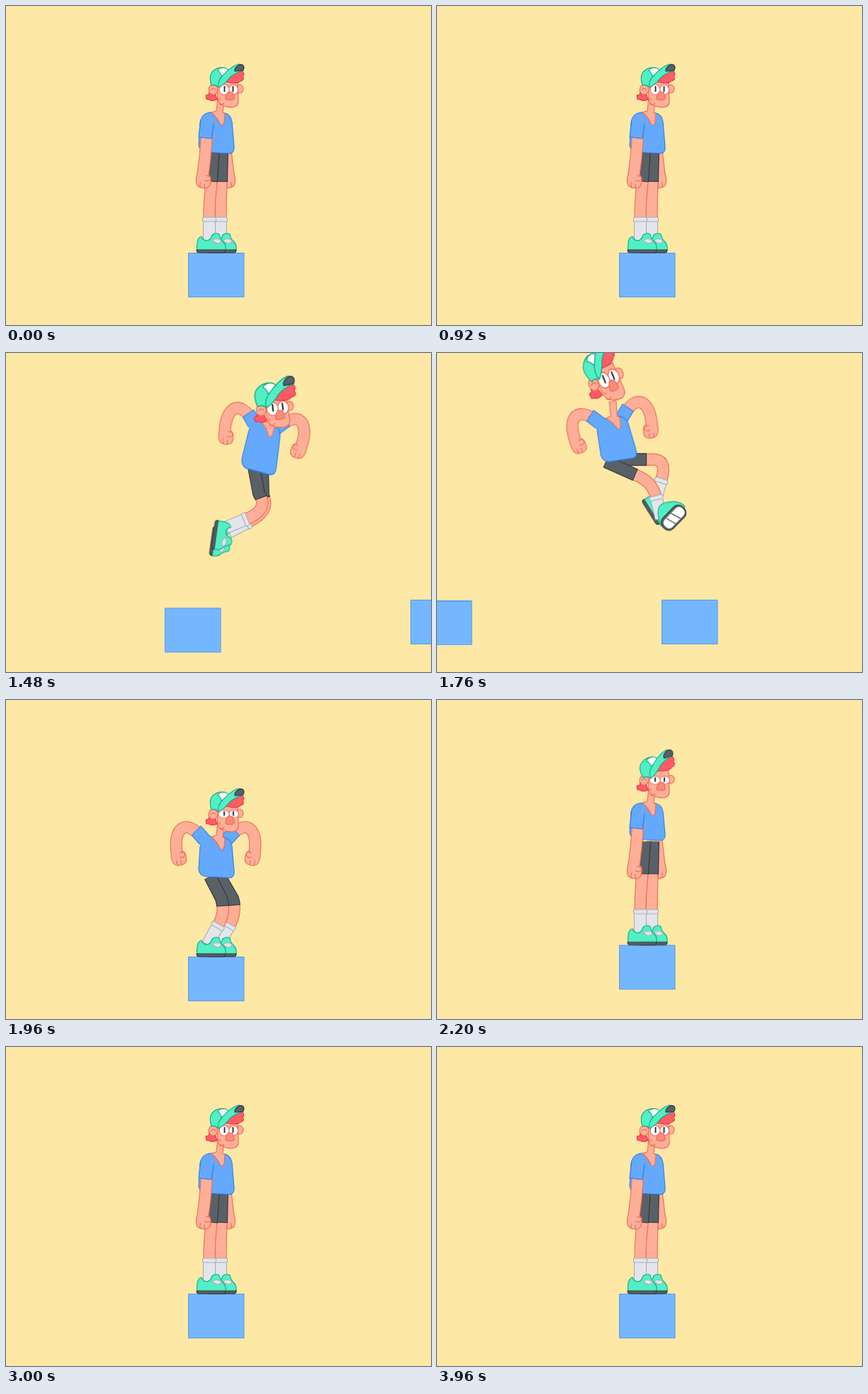
Animation of 600 by 450 pixels, one loop 4000 ms. Source, as an HTML page without scripts:

```html
<!DOCTYPE html>
<html lang="en">
<head>
<meta charset="utf-8">
<title>Jump</title>
<style>
html, body { margin: 0; width: 100%; height: 100%; overflow: hidden; background: #fde8a6; }
svg { display: block; width: 100vw; height: 100vh; }
path, rect, ellipse { stroke-width: 1.1; stroke-linejoin: round; }

.block { fill: #75b7ff; stroke: #5799e6; stroke-width: 1; }
.skin { fill: #ffae98; stroke: #ee6a55; }
.blue { fill: #64a9fe; stroke: #2c7ce8; }
.mint { fill: #52efc5; stroke: #13a883; }
.red { fill: #ff5b66; stroke: #dc3a4c; }
.dark { fill: #596167; stroke: #30363b; }
.pale { fill: #e3e5ea; stroke: #a9adb5; }
.white { fill: #fff; stroke: #ee6a55; }
.nose { fill: #f78b79; stroke: #ee6a55; }
.line { fill: none; stroke: #ee6a55; }
.ink { fill: none; stroke: #24282d; }

/* a limb is a wide outline stroke under a narrower colour stroke */
.edge, .core { fill: none; }
.edge { stroke: #ee6a55; stroke-width: 17.2; }
.core { stroke: #ffae98; stroke-width: 15; }
.arm.core { marker-end: url(#fist); }
.leg1.core, .leg2.core { marker-end: url(#sock); }
.edge.shorts { stroke: #30363b; stroke-width: 18; stroke-dasharray: 46 999; }
.core.shorts { stroke: #596167; stroke-width: 15.8; stroke-dasharray: 45 999; marker-end: none; }

.m { animation: 4s cubic-bezier(.4,.2,.6,.8) infinite; }
.slide { animation-name: slide; }
.kick { animation-name: kick; }
.give { animation-name: give; }
.arc { animation-name: arc; }
.drop { animation-name: drop; }
.chest { animation-name: chest; transform-origin: 296px 152px; }
.torso { animation-name: torso; transform-origin: 296px 152px; }
.swing { animation-name: swing; transform-origin: 284px 158px; }
.sleeve { animation-name: sleeve; transform-origin: 284px 158px; }
.arm { animation-name: arm; }
.leg1 { animation-name: leg1; }
.leg2 { animation-name: leg2; }
.foot1 { animation-name: foot1; }
.foot2 { animation-name: foot2; }
.tilt { animation-name: tilt; }
.side { animation-name: side; }
.under { animation-name: under; }
.head { animation-name: head; transform-origin: 314.5px 118px; }
.eyes { animation-name: eyes; transform-origin: 314.5px 118px; }
.hat { animation-name: hat; transform-origin: 302px 106px; }

/* key times: crouch 31, push 34.5, rise 37, glide 44, land 49, stretch 55, rest 63 */
@keyframes slide {
  0%, 34.6% { transform: none; animation-timing-function: cubic-bezier(.33,0,.67,1); }
  47.4%, 100% { transform: translateX(-347px); }
}
@keyframes kick {
  0%, 24%, 48%, 100% { transform: none; }
  31% { transform: translateY(4px); }
  37% { transform: translateY(11.5px); }
  44% { transform: translateY(1.5px); }
}
@keyframes give {
  0%, 24%, 37%, 47.5%, 63%, 100% { transform: none; }
  31% { transform: translateY(4px); }
  49% { transform: translateY(14px); }
  55% { transform: translateY(-2.5px); }
}
@keyframes arc {
  0%, 37%, 44%, 100% { transform: none; }
  40% { transform: translate(8px,-14px); }
}
@keyframes drop {
  0%, 24%, 34.5%, 44%, 63%, 100% { transform: none; }
  31%, 49% { transform: translateY(29px); }
  55% { transform: translateY(-2.5px); }
}
@keyframes chest {
  0%, 34.5%, 49%, 100% { transform: translate(0,0) rotate(0deg); }
  37% { transform: translate(71px,-51px) rotate(11deg); }
  44% { transform: translate(-51px,-59px) rotate(-12deg); }
}
@keyframes torso {
  0%, 34.5%, 49%, 63%, 100% { transform: none; }
  37% { transform: scaleY(1.22); }
  44% { transform: scaleY(1.08); }
  55% { transform: scaleY(.91); }
}
@keyframes swing {
  0%, 24%, 37%, 100% { transform: none; }
  31% { transform: rotate(18deg); }
}
@keyframes sleeve {
  0%, 34.5%, 55%, 100% { transform: rotate(0deg) scale(1); }
  37%, 49% { transform: rotate(130deg) scale(1,.8); }
}
@keyframes arm {
  0%, 34.5%, 55%, 100% { d: path("M284 160C284 195 281 215 278 238"); }
  37%, 49% { d: path("M274 148C252 124 236 140 241 172"); }
}
@keyframes leg1 {
  0%, 24%, 34.5%, 55%, 100% { d: path("M293 202L290 248Q287 275 287 299"); }
  31%, 49% { d: path("M288 235L304 266Q310 285 300 303"); }
  37% { d: path("M350 160L357 198Q372 221 340 234"); }
  44% { d: path("M238 153L283 173Q304 182 309 202"); }
}
@keyframes leg2 {
  0%, 24%, 34.5%, 55%, 100% { d: path("M305 202L304 248Q303 275 303 299"); }
  31%, 49% { d: path("M302 235L320 266Q326 285 316 303"); }
  37% { d: path("M362 160L363 202Q374 222 343 238"); }
  44% { d: path("M250 150L302 150Q326 148 317 178"); }
}
@keyframes foot1 {
  0%, 34.5%, 49%, 100% { transform: translate(286px,330px); }
  37% { transform: translate(311px,255px); }
  44% { transform: translate(320px,222px); }
}
@keyframes foot2 {
  0%, 34.5%, 49%, 100% { transform: translate(301px,330px); }
  37% { transform: translate(308px,264px); }
  44% { transform: translate(313px,213px); }
}
@keyframes tilt {
  0%, 34.5%, 49%, 100% { transform: rotate(0deg); }
  37% { transform: rotate(98deg); }
  44% { transform: rotate(58deg); }
}
@keyframes side {
  0%, 46.5%, 100% { opacity: 1; animation-timing-function: step-end; }
  41.5% { opacity: 0; animation-timing-function: step-end; }
}
@keyframes under {
  0%, 46.5%, 100% { opacity: 0; animation-timing-function: step-end; }
  41.5% { opacity: 1; animation-timing-function: step-end; }
}
@keyframes head {
  0%, 34.5%, 49%, 100% { transform: translate(0,0) rotate(0deg) scale(1); }
  37% { transform: translate(69.5px,-40px) rotate(-7deg) scale(1.08,1.1); }
  44% { transform: translate(-72px,-82.5px) rotate(-22deg) scale(1.05,1.3); }
}
@keyframes eyes {
  0%, 24%, 34.5%, 63%, 100% { transform: scale(1); }
  31%, 49%, 55% { transform: scale(1.08,.8); }
  37%, 44% { transform: scale(1.08,1.2); }
}
@keyframes hat {
  0%, 34.5%, 49%, 63%, 100% { transform: rotate(0deg) scale(1); }
  37% { transform: rotate(0deg) scale(1.13); }
  44% { transform: rotate(-14deg) scale(1); }
  55% { transform: rotate(-12deg) scale(1.05); }
}
</style>
</head>
<body>
<svg viewBox="0 0 600 450">
  <defs>
    <marker id="fist" markerUnits="userSpaceOnUse" markerWidth="30" markerHeight="30" orient="auto" overflow="visible">
      <g transform="rotate(-90) translate(1 8)">
        <path class="skin" d="M-9-9Q-11 2-7 8Q-2 12 6 10Q12 8 11-1Q11-8 6-9"/>
        <path class="line" d="M3-7Q12-8 10-2Q6 2 2-1M-3 3Q-4 8-2 10M3 4V10"/>
      </g>
    </marker>
    <marker id="sock" markerUnits="userSpaceOnUse" markerWidth="40" markerHeight="30" orient="auto" overflow="visible">
      <rect class="pale" x="0" y="-8.5" width="32" height="17"/>
      <rect class="pale" x="-1" y="-9.5" width="6" height="19" rx="1.5"/>
    </marker>
    <g id="shoe">
      <path class="mint" d="M-16 15Q-18-3-10-5Q-8 1-2 1Q3 0 5-7Q10-11 15-8Q16-2 21 3Q25 7 24 15Z"/>
      <path class="pale" d="M5 1Q11-4 18 1Q18 4 12 5Q8 3 5 1Z"/>
      <path class="dark" d="M-17 14H24Q24 18 20 18H-13Q-17 18-17 14Z"/>
    </g>
  </defs>

  <rect width="600" height="450" fill="#fde8a6"/>

  <g class="m slide">
    <rect class="m kick block" x="257.500" y="348.500" width="78.500" height="62"/>
    <rect class="m give block" x="604.500" y="348.500" width="78.500" height="62"/>
  </g>

  <g class="m give"><g class="m arc">

    <!-- far arm: the near arm mirrored -->
    <g class="m drop"><g class="m chest"><g transform="matrix(-1 0 0 1 592 0)">
      <g class="m swing"><path class="m arm edge"/><path class="m arm core"/></g>
      <g class="m swing"><path class="m sleeve blue" d="M275 157L272 185L290 187L293 160Z"/></g>
    </g></g></g>

    <path class="m leg2 edge"/><path class="m leg2 core"/>
    <path class="m leg2 edge shorts"/><path class="m leg2 core shorts"/>
    <g class="m foot2"><g class="m tilt"><use href="#shoe"/></g></g>

    <path class="m leg1 edge"/><path class="m leg1 core"/>
    <path class="m leg1 edge shorts"/><path class="m leg1 core shorts"/>
    <g class="m foot1">
      <g class="m side"><g class="m tilt"><use href="#shoe"/></g></g>
      <g class="m under">
        <path class="mint" d="M-7 10Q-11-8 2-11Q21-16 30-6L18 14Q0 26-5 20Z"/>
        <g transform="translate(14 10) rotate(-46)">
          <rect class="dark" x="-20" y="-10.500" width="40" height="21" rx="9"/>
          <rect x="-17" y="-7" width="35" height="15" rx="6" fill="#fff"/>
          <path class="ink" d="M-8-7L-4 8M2-7L6 8"/>
        </g>
      </g>
    </g>

    <g class="m drop">
      <g class="m chest">
        <path class="m torso blue" d="M287 150Q276 152 274 164L272 196Q273 204 281 206L316 208Q323 207 322 198L319 163Q317 153 309 151Z"/>
        <g class="m swing"><path class="m arm edge"/><path class="m arm core"/></g>
        <g class="m swing">
          <g class="m sleeve">
            <path d="M275 160L272 185L290 187L293 166Q287 150 275 160Z" fill="#64a9fe"/>
            <path fill="none" stroke="#2c7ce8" d="M275 160L272 185L290 187L293 166"/>
          </g>
        </g>
        <path class="skin" d="M299 128L297 148L290 150Q299 158 302 166Q306 171 308 164L309 152L306 150L309 128Z"/>
      </g>

      <g class="m head">
        <path class="red" d="M294 119Q284 121 287 125Q280 125 283 129Q281 132 287 132Q290 135 298 132Z"/>
        <ellipse class="skin" cx="330" cy="117" rx="5" ry="6"/>
        <path class="skin" d="M297 106L299 129Q299 138 306 140Q311 143 320 143Q329 142 328 132L327 104Z"/>
        <ellipse class="skin" cx="292.500" cy="118" rx="6.500" ry="7"/>
        <path class="line" d="M289 119Q291 114 296 118M301 138Q304 141 308 137M301 130L303 133"/>
        <g class="m eyes">
          <ellipse class="white" cx="321" cy="118" rx="6.500" ry="7"/>
          <ellipse class="white" cx="308" cy="118" rx="7" ry="7.300"/>
          <path class="ink" style="stroke-width:1.800" d="M308.500 113V121M320.500 113V121"/>
        </g>
        <path class="nose" d="M313 122Q308 131 311 132Q318 134 322 131Q323 129 320 122Q316 120 313 122Z"/>
        <g class="m hat">
          <path class="red" d="M311 107Q317 99 322 96L333 91Q338 96 334 99Q338 104 331 106Q325 111 311 107Z"/>
          <path class="line" d="M334 99Q330 102 326 99M331 106Q327 106 326 104"/>
          <path class="mint" d="M290 112Q286 99 291 93Q298 86 306 87Q313 88 315 95L300 114Q294 110 290 112Z"/>
          <path d="M299 91Q301 87 308 87Q314 88 315 94Q308 97 304 99Q303 94 299 91Z" fill="#fff" stroke="#13a883"/>
          <path class="mint" d="M300 115Q298 106 306 98Q318 85 328 82Q338 82 335 91Q322 95 316 101Q309 110 300 115Z"/>
          <path class="dark" d="M323 89Q328 81 334 83Q338 87 334 91Q328 92 323 92Z"/>
        </g>
      </g>
    </g>
  </g></g>
</svg>
</body>
</html>
```
